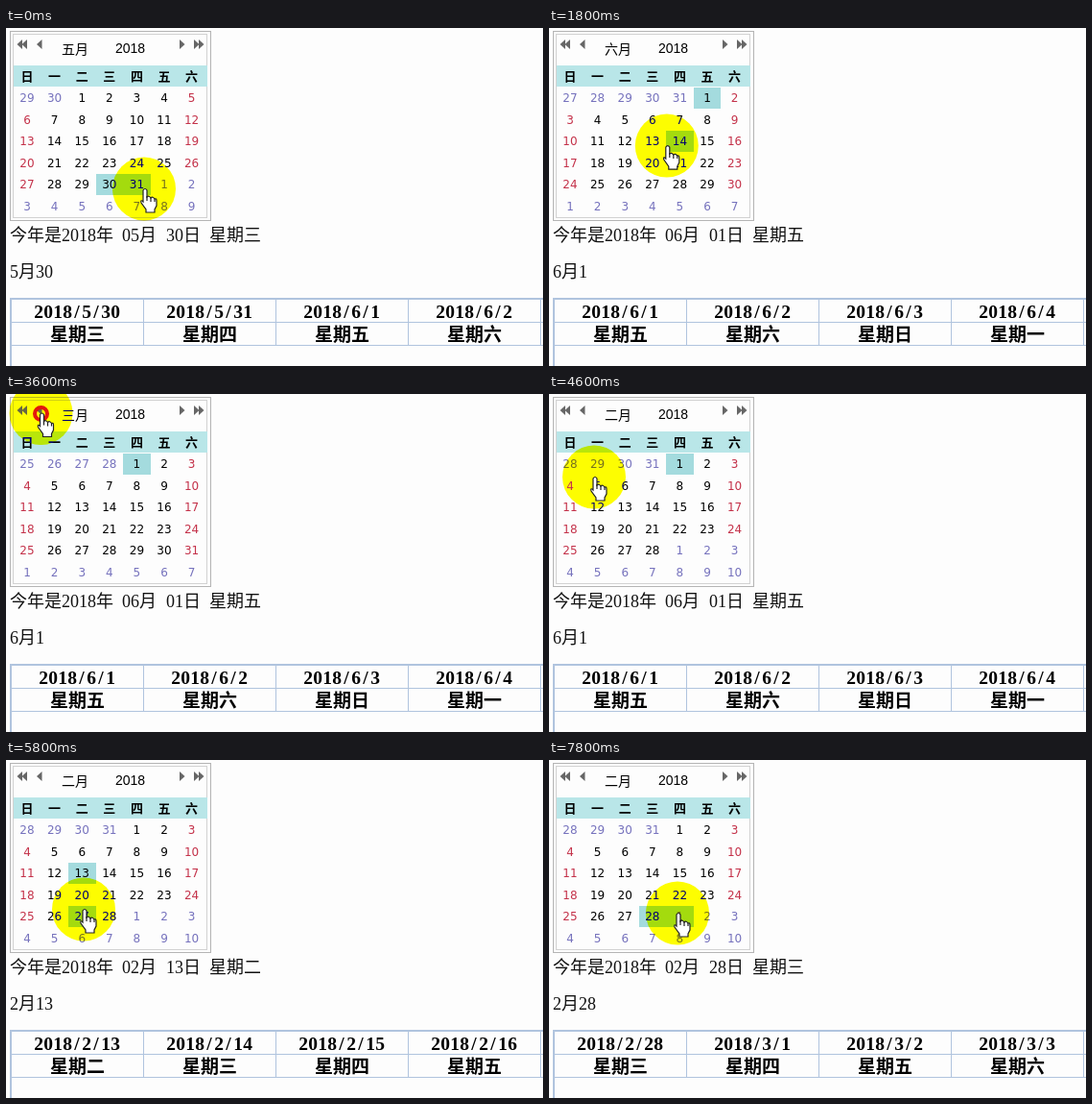
These frames come from a looping animation (560 by 352 pixels, 8000 ms). An HTML page with a canvas:

```html
<!DOCTYPE html>
<html lang="zh">
<head>
<meta charset="utf-8">
<title>日历</title>
<style>
html, body { margin: 0; width: 100%; height: 100%; overflow: hidden; background: #fdfdfd; }
canvas { display: block; }
</style>
</head>
<body>
<canvas id="stage" width="560" height="352"></canvas>
<script>
const ctx = document.getElementById('stage').getContext('2d');
const LOOP = 8000, STEP = 200;
const CJK = '"Noto Sans CJK SC", "Noto Sans CJK", sans-serif';
const SERIF = '"Liberation Serif", "Noto Sans CJK SC", "Noto Sans CJK", serif';
const DAYS = '日一二三四五六';
const LINE = '#b0c4de';

// where the pointer rests: from, until, x, y
const STOPS = [
  [0, 0, 144, 167], [1000, 1500, 153, 158], [2400, 3800, 36.5, 19.5],
  [4600, 4700, 47, 86], [5200, 5200, 79, 117], [5800, 6200, 81, 155],
  [6600, 7000, 125, 168], [7400, 7400, 108, 163], [7800, LOOP, 134, 159]
];
const CLICKS = [400, 1200, 2400, 2800, 3200, 3600, 5200, 6200, 7400];

const GRID = { x: 7.7, y: 62, w: 28.6, h: 22.5 };

const date = (month, day) => new Date(2018, month - 1, day);
const monthOf = d => d.getMonth() + 1;
const pad = n => String(n).padStart(2, '0');
const weekday = d => '星期' + DAYS[d.getDay()];

function pointer(t) {
  const i = STOPS.findIndex(s => s[1] >= t);
  const [from, , x, y] = STOPS[i];
  if (t >= from) return [x, y];
  const [, left, x0, y0] = STOPS[i - 1];
  const u = (t - left) / (from - left), e = u * u * (3 - 2 * u);
  return [x0 + (x - x0) * e, y0 + (y - y0) * e];
}

// index of the day cell under a point, or -1
function cellAt(x, y) {
  const c = Math.floor((x - GRID.x) / GRID.w);
  const r = Math.floor((y - GRID.y) / GRID.h);
  const inset = y - GRID.y - r * GRID.h;
  return r >= 0 && r < 6 && c >= 0 && c < 7 && inset >= 2.5 ? r * 7 + c : -1;
}

// a month that starts on Sunday is led by a whole earlier week
const cellDate = (month, i) => date(month, 1 - (date(month, 1).getDay() || 7) + i);

// replays the clicks so far; the page answers one step later
function stateAt(t) {
  let chosen = date(5, 30), month = 5, mark = 30;
  for (const click of CLICKS.filter(c => c < t)) {
    const i = cellAt(...pointer(click));
    if (i < 0) {
      month--;
      mark = 1;
    } else {
      chosen = cellDate(month, i);
      month = monthOf(chosen);
      mark = chosen.getDate();
    }
  }
  return { chosen, month, mark };
}

function text(s, x, y, font, color = '#000', align = 'center') {
  ctx.font = font;
  ctx.fillStyle = color;
  ctx.textAlign = align;
  ctx.fillText(s, x, y);
}

function rect(x, y, w, h, color) {
  ctx.fillStyle = color;
  ctx.fillRect(x, y, w, h);
}

function frame(x, y, w, h, color) {
  ctx.strokeStyle = color;
  ctx.lineWidth = 1;
  ctx.strokeRect(x + .5, y + .5, w, h);
}

function arrows(x, dir, count) {
  ctx.fillStyle = '#666';
  for (let i = 0; i < count; i++) {
    const tip = x + 5 * dir * i;
    ctx.beginPath();
    ctx.moveTo(tip, 17);
    ctx.lineTo(tip + 5.5 * dir, 12);
    ctx.lineTo(tip + 5.5 * dir, 22);
    ctx.fill();
  }
}

function calendar(month, mark, px, py) {
  frame(4, 3, 209, 197, '#b4b4b4');
  frame(7, 6, 202, 191, '#d2d2d2');
  arrows(11.5, 1, 2);
  arrows(32, 1, 1);
  arrows(186.5, -1, 1);
  arrows(206.5, -1, 2);
  text(DAYS[month] + '月', 72, 27, '14px ' + CJK);
  text('2018', 129.5, 26, '14px "Liberation Sans", sans-serif');

  const edge = c => Math.round(GRID.x + GRID.w * c);
  const mid = c => GRID.x + GRID.w * (c + .5);
  rect(8, 39, 202, 22, '#b9e6e8');
  for (let c = 0; c < 7; c++) text(DAYS[c], mid(c), 55, 'bold 13px ' + CJK);

  const hover = cellAt(px, py);
  for (let i = 0; i < 42; i++) {
    const c = i % 7, y = GRID.y + GRID.h * Math.floor(i / 7);
    const d = cellDate(month, i);
    const inside = monthOf(d) === month;
    if (i === hover || inside && d.getDate() === mark)
      rect(edge(c), Math.floor(y), edge(c + 1) - edge(c), 22, '#a4dbde');
    const color = !inside ? '#7672bd' : c % 6 ? '#000' : '#c4324a';
    text(d.getDate(), mid(c), Math.round(y + 15), '12px "DejaVu Sans", sans-serif', color);
  }
}

function labels(d) {
  const day = d.getDate(), month = monthOf(d);
  const left = (s, x, y) => text(s, x, y, '18px ' + SERIF, '#111', 'left');
  left('今年是2018年', 4, 221.5);
  left(pad(month) + '月', 121, 221.5);
  left(pad(day) + '日', 167, 221.5);
  left(weekday(d), 212, 221.5);
  left(month + '月' + day, 4, 260);
}

function table(first) {
  rect(4, 281, 556, 2, LINE);
  rect(4, 281, 2, 71, LINE);
  rect(4, 306, 556, 1, LINE);
  rect(4, 330, 556, 1, LINE);
  for (let i = 0; i < 4; i++) {
    const x = 74 + 138 * i;
    rect(x + 69, 281, 1, 50, LINE);
    const d = date(monthOf(first), first.getDate() + i);
    const s = `2018/${monthOf(d)}/${d.getDate()}`;
    // fixed pitch
    [...s].forEach((ch, k) => text(ch, x + 10 * (k - (s.length - 1) / 2), 302, 'bold 19.5px ' + SERIF));
    text(weekday(d), x + .5, 326, 'bold 19px ' + CJK);
  }
}

function disc(x, y, mode, color) {
  ctx.globalCompositeOperation = mode;
  ctx.fillStyle = color;
  ctx.beginPath();
  ctx.arc(x, y + .5, 33, 0, 7);
  ctx.fill();
  ctx.globalCompositeOperation = 'source-over';
}

const hand = new Path2D('M-2 2Q0 -1 2 2V9Q4 7 6 10Q8 8 10 11Q12 10 12 13V18L10 22V25H1V22L-4 15Q-5 11 -2 14Z');
const fingers = new Path2D('M2 8V13M6 10V14M10 11V14');

function cursor(x, y, pressed) {
  // white turns yellow, dark ink turns navy
  disc(x, y, 'multiply', 'rgb(255,255,110)');
  disc(x, y, 'difference', 'rgb(0,0,110)');
  if (pressed) {
    ctx.strokeStyle = '#e3170d';
    ctx.lineWidth = 4;
    ctx.beginPath();
    ctx.arc(x, y + 1, 6.5, 0, 7);
    ctx.stroke();
  }
  ctx.save();
  ctx.translate(x + 1, y);
  ctx.fillStyle = '#fff';
  ctx.strokeStyle = '#222';
  ctx.lineWidth = 1.2;
  ctx.fill(hand);
  ctx.stroke(hand);
  ctx.stroke(fingers);
  ctx.restore();
}

function draw(now) {
  const t = Math.floor(now % LOOP / STEP) * STEP;
  const [x, y] = pointer(t);
  const { chosen, month, mark } = stateAt(t);
  rect(0, 0, 560, 352, '#fdfdfd');
  calendar(month, mark, x, y);
  labels(chosen);
  table(chosen);
  cursor(x, y, CLICKS.includes(t));
  requestAnimationFrame(draw);
}
requestAnimationFrame(draw);
</script>
</body>
</html>
```
